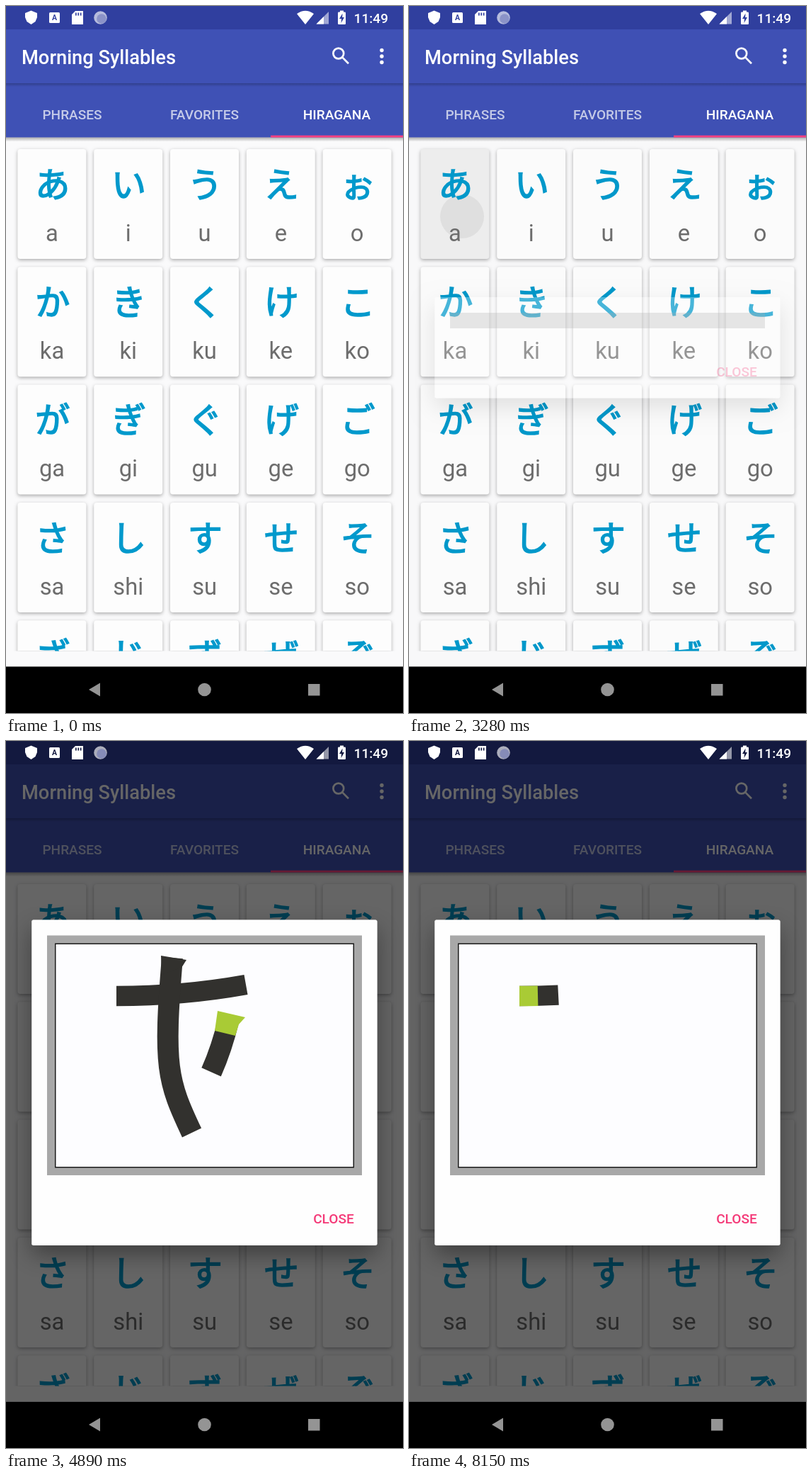
An HTML page with a canvas that plays this animation: 561 by 998 pixels, repeating every 8250 ms.

```html
<!DOCTYPE html>
<html lang="ja">
<head>
<meta charset="utf-8">
<title>Hiragana chart</title>
<style>
  html, body { margin: 0; width: 100%; height: 100%; overflow: hidden; background: #000; }
  canvas { display: block; width: 561px; height: 998px; }
</style>
</head>
<body>
<canvas id="stage" width="561" height="998"></canvas>
<script>
const ctx = document.getElementById('stage').getContext('2d');
const W = 561, H = 998, LOOP = 8250, NAV_TOP = 932.5;
const DP = W / 411.4;
const LATIN = 'Roboto, sans-serif';
const KANA = '"Noto Sans CJK JP", "Noto Sans CJK", sans-serif';
const INK = '#32312e', GREEN = '#a9cb35', PINK = '#f43a78';

const KANA_ROWS = ('あいうえぉ かきくけこ がぎぐげご さしすせそ ざじずぜぞ たちつてと ' +
  'だぢづでど なにぬねの はひふへほ ばびぶべぼ ぱぴぷぺぽ まみむめも').split(' ');
const CONSONANTS = ['', ...'kgsztdnhbpm'];
const IRREGULAR = { si: 'shi', zi: 'ji', ti: 'chi', tu: 'tsu', di: 'ji', du: 'zu', hu: 'fu' };

// Bezier centre lines of the three brush strokes, drawn at constant speed between begin and end.
const STROKES = [
  { begin: 3320, end: 3950, path: 'M156 360 Q250 360 339 344' },
  { begin: 4170, end: 4710, path: 'M235 306 C222 460 228 480 262.5 553',
    serif: [[219, 303], [255, 309], [248, 320], [220, 330]] },
  { begin: 4800, end: 7050,
    path: 'M314.5 394 C300 455 262 555 197 555 S152 475 215 440 S290 419 328 425 S435 550 299 573',
    serif: [[299, 381], [338, 390], [329, 400], [324, 416], [295, 409]] }
];
// Explicit control points keep the closing loop and the last arc round.
STROKES[2].path = 'M314.5 394 C300 455 262 555 197 555 C145 555 152 475 215 440' +
  ' C245 423 290 419 328 425 C420 442 435 550 299 573';

for (const stroke of STROKES) {
  const el = document.createElementNS('http://www.w3.org/2000/svg', 'path');
  el.setAttribute('d', stroke.path);
  stroke.shape = new Path2D(stroke.path);
  stroke.length = el.getTotalLength();
}

const clamp = x => Math.max(0, Math.min(1, x));
const ramp = (t, a, b) => clamp((t - a) / (b - a));
const smooth = x => (1 - Math.cos(Math.PI * x)) / 2;
const black = alpha => `rgba(0,0,0,${alpha})`;
const white = alpha => `rgba(255,255,255,${alpha})`;

function rect(x, y, w, h, fill) {
  ctx.fillStyle = fill;
  ctx.fillRect(x, y, w, h);
}

function circle(x, y, r, fill) {
  ctx.fillStyle = fill;
  ctx.beginPath();
  ctx.arc(x, y, r, 0, Math.PI * 2);
  ctx.fill();
}

function polygon(points, fill) {
  ctx.fillStyle = fill;
  ctx.beginPath();
  points.forEach(p => ctx.lineTo(...p));
  ctx.fill();
}

function text(str, x, y, sp, fill, weight = 400, align = 'center', family = LATIN) {
  ctx.font = `${weight} ${sp * DP}px ${family}`;
  ctx.textAlign = align;
  ctx.fillStyle = fill;
  ctx.fillText(str, x, y);
}

function panel(x, y, w, h, r, fill, blur = 0, drop = 0, shade = 0) {
  ctx.save();
  ctx.shadowColor = black(shade);
  ctx.shadowBlur = blur;
  ctx.shadowOffsetY = drop;
  ctx.fillStyle = fill;
  ctx.beginPath();
  ctx.roundRect(x, y, w, h, r);
  ctx.fill();
  ctx.restore();
}

function shadowBelow(y, depth, shade) {
  const g = ctx.createLinearGradient(0, y, 0, y + depth);
  g.addColorStop(0, black(shade));
  g.addColorStop(1, black(0));
  rect(0, y, W, depth, g);
}

function drawStatusIcons(hole) {
  polygon([[35.5, 6.5], [44, 10], [44, 16], [41.5, 22], [35.5, 26], [29.5, 22], [27, 16], [27, 10]], '#fff');
  panel(61, 9, 15, 15, 1.5, '#fff');
  text('A', 68.5, 20, 7.7, hole, 700);
  polygon([[98, 7], [109, 7], [109, 26], [93, 26], [93, 12]], '#fff');
  for (let i = 0; i < 3; i++) rect(98 + i * 3.4, 9.5, 1.7, 4, hole);
  circle(133.5, 16.5, 9.3, white(0.65));
  circle(135, 18, 6.8, 'rgba(96,106,180,.5)');

  ctx.fillStyle = '#fff';
  ctx.fill(new Path2D('M423 26 L411 11 Q423 2.5 435 11 Z'));
  polygon([[438.5, 25.5], [456, 25.5], [456, 8]], white(0.55));
  polygon([[438.5, 25.5], [449, 25.5], [449, 15]], '#fff');
  rect(472, 6.5, 5, 3, '#fff');
  panel(469, 8.5, 11, 17.5, 1.2, '#fff');
  polygon([[475.5, 10.5], [471, 18], [474, 18], [473.5, 24], [478, 16], [475.2, 16]], hole);
  text('11:49', 540, 23.7, 14, '#fff', 500, 'right');
}

function drawHeader() {
  rect(0, 0, W, 33, '#303f9f');
  rect(0, 33, W, 152.5, '#3f51b5');
  shadowBelow(109, 5, 0.22);
  shadowBelow(185.5, 6, 0.3);
  text('Morning Syllables', 22, 81.5, 20, '#fff', 500, 'left');

  ctx.strokeStyle = '#fff';
  ctx.lineWidth = 2.7;
  ctx.stroke(new Path2D('M475.2 72.4 L484 81.2'));
  ctx.beginPath();
  ctx.arc(469.8, 67, 7.4, 0, Math.PI * 2);
  ctx.stroke();
  for (let i = -1; i <= 1; i++) circle(531, 71 + i * 8.5, 2.7, '#fff');

  ['PHRASES', 'FAVORITES', 'HIRAGANA'].forEach((name, i) =>
    text(name, W * (i + 0.5) / 3, 160, 14, white(i === 2 ? 1 : 0.7), 500));
  rect(W * 2 / 3, 182.7, W / 3, 2.8, '#ff4081');
}

function drawRipple(t) {
  const fade = ramp(t, 2900, 3010) * (1 - ramp(t, 3400, 3730));
  if (!fade) return;
  ctx.save();
  ctx.beginPath();
  ctx.roundRect(16.4, 202, 97, 155, 4);
  ctx.clip();
  rect(16, 202, 98, 155, black(0.055 * fade));
  const radius = 31 * ramp(t, 2900, 3270) + 120 * ramp(t, 3290, 3370);
  circle(75, 297, radius, black(0.06 * fade));
  ctx.restore();
}

function drawCard(r, c, x, y, t) {
  const syllable = CONSONANTS[r] + 'aiueo'[c];
  const kana = KANA_ROWS[r][c], cx = x + 48.6;
  panel(x, y, 97, 155, 4, '#fdfdfd', 5, 1.8, 0.32);
  if (r + c === 0) drawRipple(t);
  text(kana, cx + 0.8, y + 67.7, 36, '#0099cc', 400, 'center', KANA);
  // A thin outline emboldens the regular weight.
  ctx.strokeStyle = '#0099cc';
  ctx.lineWidth = 1.6;
  ctx.lineJoin = 'miter';
  ctx.strokeText(kana, cx + 0.8, y + 67.7);
  text(IRREGULAR[syllable] || syllable, cx, y + 129.6, 24, '#6d6d6d');
}

function drawGrid(t) {
  const scroll = t < 850
    ? 1000 * Math.sin(ramp(t, 30, 850) * Math.PI / 2) ** 1.5
    : 1000 * (1 - smooth(ramp(t, 850, 1810)));
  ctx.save();
  ctx.beginPath();
  ctx.rect(10, 197, 541, 713.5);
  ctx.clip();
  for (let r = 0; r < KANA_ROWS.length; r++) {
    const y = 202 + r * 166.3 - scroll;
    if (y < 20 || y > 915) continue;
    for (let c = 0; c < 5; c++) drawCard(r, c, 16.4 + c * 107.8, y, t);
  }
  ctx.restore();
}

function drawNavBar() {
  rect(0, NAV_TOP, W, H - NAV_TOP, '#000');
  polygon([[117, 965], [133, 955.5], [133, 974.5]], '#949494');
  circle(W / 2, 965, 9.3, '#949494');
  rect(427, 957, 16.5, 16.5, '#949494');
}

function brush(shape, length, color, width) {
  ctx.strokeStyle = color;
  ctx.lineWidth = width;
  ctx.setLineDash([length, 5000]);
  ctx.stroke(shape);
  ctx.setLineDash([]);
}

function drawStrokes(t) {
  const clock = t < 8070 ? t : STROKES[0].begin;
  for (const { begin, end, shape, length, serif } of STROKES) {
    if (clock < begin) return;
    const step = Math.floor((clock - begin) / 75) * 75;
    const done = clock >= end;
    const drawn = done ? length : 55 + (length - 55) * step / (end - begin);
    const width = serif ? 30 : 28.5;
    brush(shape, drawn, INK, width);
    if (serif) polygon(serif, done ? INK : GREEN);
    else if (!done) brush(shape, 26, GREEN, width);
  }
}

function drawDialog(t) {
  const open = t >= 3325;
  const slide = 25.3 * (1 - ramp(t, 3372, 3600)) ** 2;
  const top = open ? 252.5 + slide : 411;
  const height = open ? 459.5 : 142.5;
  const box = [36.3, top, 488.2, height, 2.7];

  ctx.save();
  ctx.globalAlpha = 0.27 * ramp(t, 3235, 3280) + 0.73 * ramp(t, 3280, 3365);
  // The shadow stays outside the box so it does not show through while fading in.
  ctx.save();
  ctx.beginPath();
  ctx.rect(0, 0, W, H);
  ctx.roundRect(...box);
  ctx.clip('evenodd');
  panel(...box, '#fefefe', 32, 13, 0.38);
  ctx.restore();

  panel(...box, '#fefefe');
  rect(58, top + 22, 445, open ? 338.5 : 22, '#a8a8a8');
  text('CLOSE', 463, top + height - 30.7, 14, PINK, 500);
  if (open) {
    rect(69, top + 33, 423, 317, '#1c1c1c');
    rect(70.5, top + 34.5, 420, 314, '#fdfdff');
    ctx.translate(0, slide);
    drawStrokes(t);
  }
  ctx.restore();
}

function render(t) {
  const dim = 0.6 * ramp(t, 3280, 3375);
  rect(0, 0, W, H, '#fafafb');
  drawGrid(t);
  drawHeader();
  rect(0, 0, W, NAV_TOP, black(dim));
  drawStatusIcons(dim > 0.3 ? '#131940' : '#303f9f');
  if (t >= 3240) drawDialog(t);
  drawNavBar();
}

const start = performance.now();
function tick() {
  render((performance.now() - start) % LOOP);
  requestAnimationFrame(tick);
}
tick();
</script>
</body>
</html>
```
